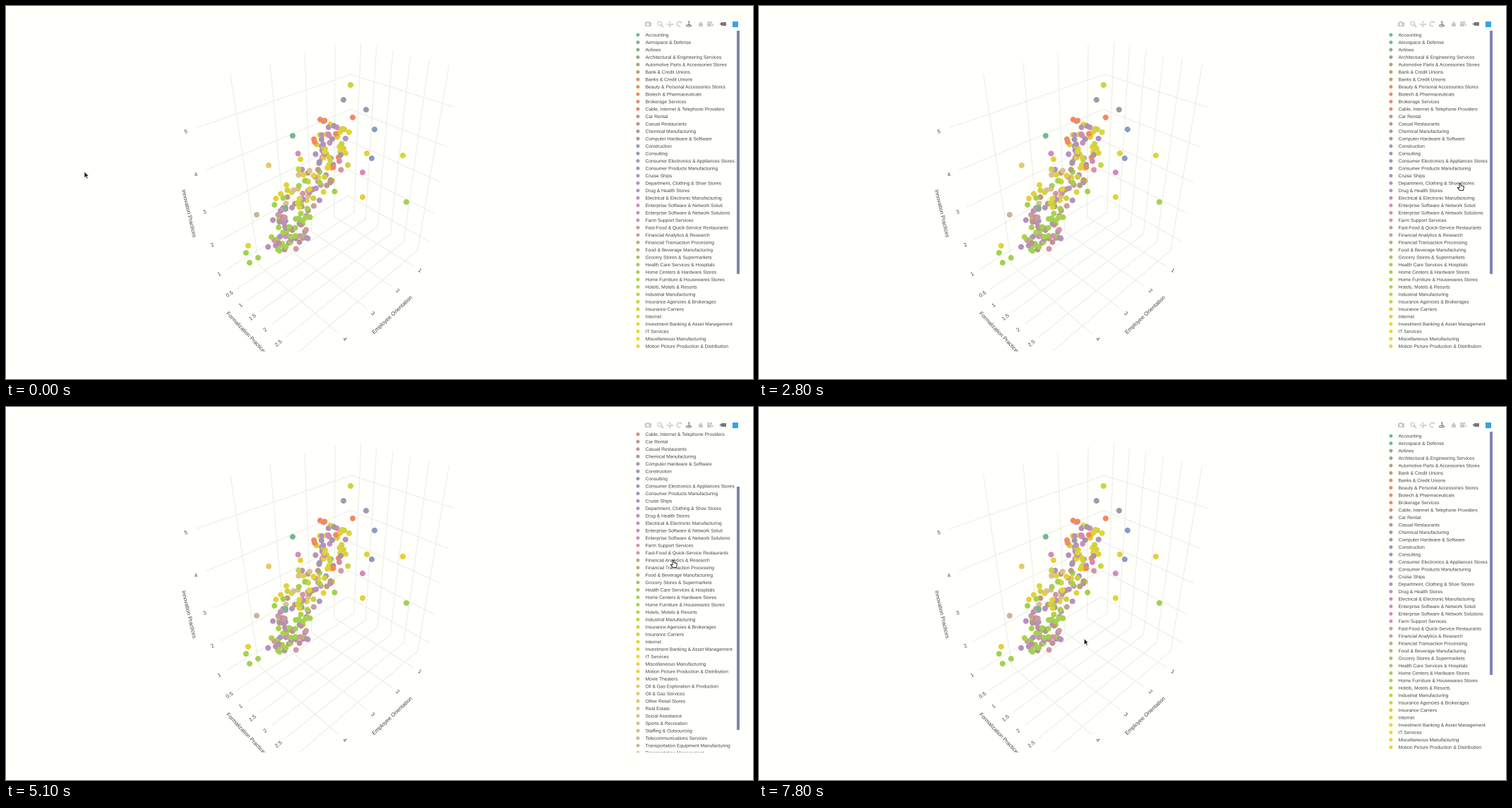
A matplotlib script for the animation above (8000 ms loop, 1058x529 px).

```python
import numpy as np
import matplotlib.pyplot as plt
from matplotlib.animation import FuncAnimation
from matplotlib.patches import Circle, Ellipse, PathPatch, Polygon, Rectangle
from matplotlib.textpath import TextPath
from matplotlib.transforms import Affine2D, Bbox, TransformedBbox

W, H, DPI = 1058, 529, 100
STEP, LOOP = 100, 8000
BG, INK, GRID, PLUM = "#fffffb", "#444444", "#e9e9e5", "#b48bbd"
PT = 72 / DPI

plt.rcParams["font.family"] = "Liberation Sans"
plt.rcParams["toolbar"] = "None"

fig = plt.figure(figsize=(W / DPI, H / DPI), dpi=DPI, facecolor=BG)
ax = fig.add_axes([0, 0, 1, 1])
ax.set_xlim(0, W)
ax.set_ylim(H, 0)
ax.axis("off")

SET2 = np.array([[102, 194, 165], [252, 141, 98], [141, 160, 203],
                 [231, 138, 195], [166, 216, 84], [255, 217, 47],
                 [229, 196, 148], [179, 179, 179]]) / 255


def ramp(i):
    """Colour of legend entry i; eight entries per palette step."""
    c = np.array([np.interp(i / 8, range(8), SET2[:, k]) for k in range(3)])
    return 0.97 * c


def shape(patch, z=4):
    patch.set_zorder(z)
    return ax.add_patch(patch)


def line(points, color=GRID, width=0.9, z=1):
    return ax.plot(*zip(*points), color=color, lw=width * PT, zorder=z)[0]


def label(x, y, s, size, rot=0, color=INK, ha=0.5, z=4, move=None):
    """Outlined text, so that it keeps its place between pixels."""
    glyphs = TextPath((0, 0), s, size=size)
    place = (Affine2D().translate(-ha * glyphs.get_extents().x1, -0.35 * size)
             .scale(1, -1).rotate_deg(-rot).translate(x, y))
    return shape(PathPatch(place.transform_path(glyphs), fc=color, lw=0,
                           transform=move or ax.transData), z)


def crop(item, box):
    item.set_clip_box(TransformedBbox(Bbox.from_extents(*box), ax.transData))


# --- axes box -------------------------------------------------------------
# Perspective: the back corner and one vanishing point per axis.
CORNER = np.array([483.6, 287.2])
VANISH = np.array([(1130, -124), (-216, -127), (461.5, 1065)])
LOW = np.array([0.377, 0.202, 0.473])
HIGH = np.array([4.93, 3.3, 5.87])
RATE = np.array([-0.0449, -0.0445, -0.0434])


def project(point):
    q = RATE * (np.asarray(point) - LOW)
    return (CORNER + q @ VANISH) / (1 + q.sum())


def wall_lines(axis, value):
    """Lines of constant value on the two walls that share the axis."""
    for run in {0, 1, 2} - {axis}:
        a, b = LOW.copy(), LOW.copy()
        a[axis] = b[axis] = value
        b[run] = HIGH[run]
        yield project(a), project(b)


TICKS = [(1, 2, 3, 4), (0.5, 1, 1.5, 2, 2.5, 3), (1, 2, 3, 4, 5)]
for axis, values in enumerate(TICKS):
    for v in values:
        for ends in wall_lines(axis, v):
            line(ends)

for e in TICKS[0]:
    label(*project((e, 3.5, LOW[2])), f"{e}", 7.5, -28 - 4 * e)
for f in TICKS[1][:-1]:
    label(*project((5.15, f, LOW[2])), f"{f:g}", 7.5, 31 + 4 * f)
for z in TICKS[2]:
    label(*project((5.17, LOW[1], z)), f"{z}", 7.5, 34 - 4 * z)

label(259.5, 294, "Innovation Practices", 7.7, -76.8)
label(546.5, 438, "Employee Orientation", 7.8, 43.4)
crop(label(313.5, 434.5, "Formalization Practices", 7.7, -46.6, ha=0),
     (240, 32, 680, 490))

# --- scatter --------------------------------------------------------------
# Legend hues that dominate the low, middle and high part of the cloud.
HUES = [(32, 20, 33, 12, 26, 32, 20, 12), (38, 36, 20, 5, 32, 48, 38, 26),
        (38, 14, 37, 8, 38, 20, 36, 23)]
OUTLIERS = [(36, 488, 112), (14, 478, 133), (14, 510, 147), (16, 522, 175),
            (8, 491, 158), (8, 445, 161), (16, 518, 216), (38, 562, 212),
            (32, 567, 278), (38, 505, 271), (38, 511, 209), (23, 505, 236),
            (1, 406, 184), (45, 372, 226), (52, 355, 296), (38, 343, 340),
            (32, 340, 350), (32, 345, 364), (32, 357, 357), (1, 396, 286)]


def cloud(count=190):
    rng = np.random.default_rng(12)
    for k, t in enumerate(np.linspace(0, 1, count) ** 1.1):
        reach = 26 + 20 * np.sin(np.pi * t)
        x = 395 + 74 * t + reach * rng.triangular(-1, 0, 1)
        y = 343 - 176 * t + rng.normal(0, 4)
        yield HUES[min(2, int(3 * t))][k * 5 % 8], x, y


hues, xs, ys = zip(*cloud(), *OUTLIERS)
ax.scatter(xs, ys, s=(8 * PT) ** 2, c=[ramp(h) for h in hues], linewidths=0, zorder=3)

# --- hover ----------------------------------------------------------------
SPOT = np.array([2.604656, 0.7748919, 1.856208])
hover = []
for axis in range(3):
    hit = SPOT.copy()
    hit[axis] = LOW[axis]
    hover.append(line([project(SPOT), project(hit)], INK, 1, 2))
    hover += [line(ends, INK, 1, 2) for ends in wall_lines(axis, SPOT[axis])]

hover.append(shape(Polygon([project(SPOT), (432, 290), (432, 278), (477, 278),
                            (477, 308), (432, 308), (432, 296)],
                           fc=PLUM, ec=INK, lw=0.8 * PT), 5))
for n, (key, value) in enumerate(zip("xyz", SPOT)):
    hover.append(label(434, 284 + 9.2 * n, f"{key}: {value:.7g}", 7.2, ha=0, z=6))
hover.append(label(478, 284, "Department, ...", 7.2, color=PLUM, ha=0, z=6))

# --- legend ---------------------------------------------------------------
NAMES = """Accounting
Aerospace & Defense
Airlines
Architectural & Engineering Services
Automotive Parts & Accessories Stores
Bank & Credit Unions
Banks & Credit Unions
Beauty & Personal Accessories Stores
Biotech & Pharmaceuticals
Brokerage Services
Cable, Internet & Telephone Providers
Car Rental
Casual Restaurants
Chemical Manufacturing
Computer Hardware & Software
Construction
Consulting
Consumer Electronics & Appliances Stores
Consumer Products Manufacturing
Cruise Ships
Department, Clothing & Shoe Stores
Drug & Health Stores
Electrical & Electronic Manufacturing
Enterprise Software & Network Soluti
Enterprise Software & Network Solutions
Farm Support Services
Fast-Food & Quick-Service Restaurants
Financial Analytics & Research
Financial Transaction Processing
Food & Beverage Manufacturing
Grocery Stores & Supermarkets
Health Care Services & Hospitals
Home Centers & Hardware Stores
Home Furniture & Housewares Stores
Hotels, Motels & Resorts
Industrial Manufacturing
Insurance Agencies & Brokerages
Insurance Carriers
Internet
Investment Banking & Asset Management
IT Services
Miscellaneous Manufacturing
Motion Picture Production & Distribution
Movie Theaters
Oil & Gas Exploration & Production
Oil & Gas Services
Other Retail Stores
Real Estate
Social Assistance
Sports & Recreation
Staffing & Outsourcing
Telecommunications Services
Transportation Equipment Manufacturing
Transportation Management
TV Broadcast & Cable Networks
Vehicle Dealers
Video Games""".split("\n")
ROW, SCROLL_MAX = 10.512, 147.5

shift = Affine2D()
scrolled = shift + ax.transData
for i, name in enumerate(NAMES):
    y = 41 + ROW * i
    row = (label(905.6, y, name, 6.64, ha=0, move=scrolled),
           shape(Circle((895, y), 2.5, fc=ramp(i), lw=0, transform=scrolled)))
    for item in row:
        crop(item, (885, 32.6, W, 490))
bar = shape(Rectangle((1035.3, 35), 3.4, 345, fc="#7d87ad", lw=0))


# --- toolbar --------------------------------------------------------------
def toolbar(y=25.5, pale="#c9c9c6", dark="#77777a"):
    def block(x, top, w, h, color=pale):
        shape(Rectangle((x - w / 2, y + top), w, h, fc=color, lw=0))

    def ring(x, dy, r, color=pale):
        shape(Circle((x, y + dy), r, fc="none", ec=color, lw=1.2 * PT))

    def head(x, dy, angle, color=pale, size=2.2):
        turn = Affine2D().rotate_deg(angle).translate(x, y + dy)
        tri = turn.transform(size * np.array([(0, -0.6), (0, 0.6), (1, 0)]))
        shape(Polygon(tri, fc=color, lw=0))

    block(909, -2.5, 9, 6)
    block(909, -3.8, 4, 2)
    shape(Circle((909, y + 0.5), 1.8, fc=BG, lw=0), 5)

    ring(925.7, -0.7, 2.8)
    line([(927.8, y + 1.3), (930.5, y + 3.8)], pale, 1.8, 4)

    line([(936.5, y), (943.5, y)], pale, 1.2, 4)
    line([(940, y - 3.5), (940, y + 3.5)], pale, 1.2, 4)
    for a in range(0, 360, 90):
        head(940 + 2.6 * np.cos(np.radians(a)), 2.6 * np.sin(np.radians(a)), a)

    arc = np.radians(np.linspace(70, 300, 30))
    line(list(zip(953.5 + 3.2 * np.cos(arc), y + 3.2 * np.sin(arc))), pale, 1.4, 4)
    head(955, -2.6, 20, size=2.8)

    line([(967, y - 3), (967, y + 1.5)], dark, 1.2, 4)
    head(967, -2.6, -90, dark)
    shape(Ellipse((967, y + 2.3), 7, 2.6, fc="none", ec=dark, lw=PT))

    block(984, -0.3, 6.4, 3.8)
    head(984, 0.2, -90, size=4.3)
    block(996, -0.7, 6, 4.4)
    head(1002, 1.5, 180, size=3)
    for x in (995, 998.6):
        shape(Circle((x, y - 2.2), 1.7, fc=pale, lw=0))

    block(1016.7, -2.4, 6.6, 4.8, dark)
    head(1013.5, 0, 180, dark, 3.2)
    block(1033.2, -4, 8.4, 8, "#36a3e3")


toolbar()

# --- pointer --------------------------------------------------------------
ARROW = np.array([(0, 0), (0, 8.6), (2, 6.8), (3.4, 9.9), (4.9, 9.2), (3.5, 6.3), (6, 6.1)])
HAND = np.array([(-0.9, 0.3), (0.8, 0.3), (1, 3.8), (5.4, 4.8), (4.6, 10.6),
                 (-0.8, 10.6), (-3.8, 6.2), (-0.9, 7)])
arrow = shape(Polygon(ARROW, fc="#1c1c1c", ec="white", lw=0.5 * PT), 9)
hand = shape(Polygon(HAND, fc="white", ec="#1c1c1c", lw=0.9 * PT, joinstyle="round"), 9)

# time, x, y of the pointer tip
PATH = np.array([
    (300, 111, 235), (800, 500, 321), (1000, 511, 347), (1100, 511, 347),
    (1500, 499, 295), (1600, 499, 295), (2500, 981, 251), (2800, 993, 251),
    (3800, 993, 251), (4100, 945, 217), (5900, 945, 217), (6800, 463, 325),
    (7000, 460.5, 328.5)])


def scroll(t):
    if t < 3100 or t >= 5600:
        return 0
    return SCROLL_MAX if t < 5100 else 107.5 if t < 5300 else 66


def update(n):
    t = n * STEP
    tip = [np.interp(t, PATH[:, 0], PATH[:, k]) for k in (1, 2)]
    over = 2600 <= t < 4100 or 4300 <= t < 6000
    arrow.set_xy(ARROW + tip)
    hand.set_xy(HAND + tip)
    arrow.set_visible(not over)
    hand.set_visible(over)

    for item in hover:
        item.set_visible(800 <= t < 1000)

    off = scroll(t)
    shift.clear().translate(0, -off)
    bar.set_y(35 + 107.5 * off / SCROLL_MAX)
    return []


anim = FuncAnimation(fig, update, frames=LOOP // STEP, interval=STEP, repeat=True)
plt.show()
```
